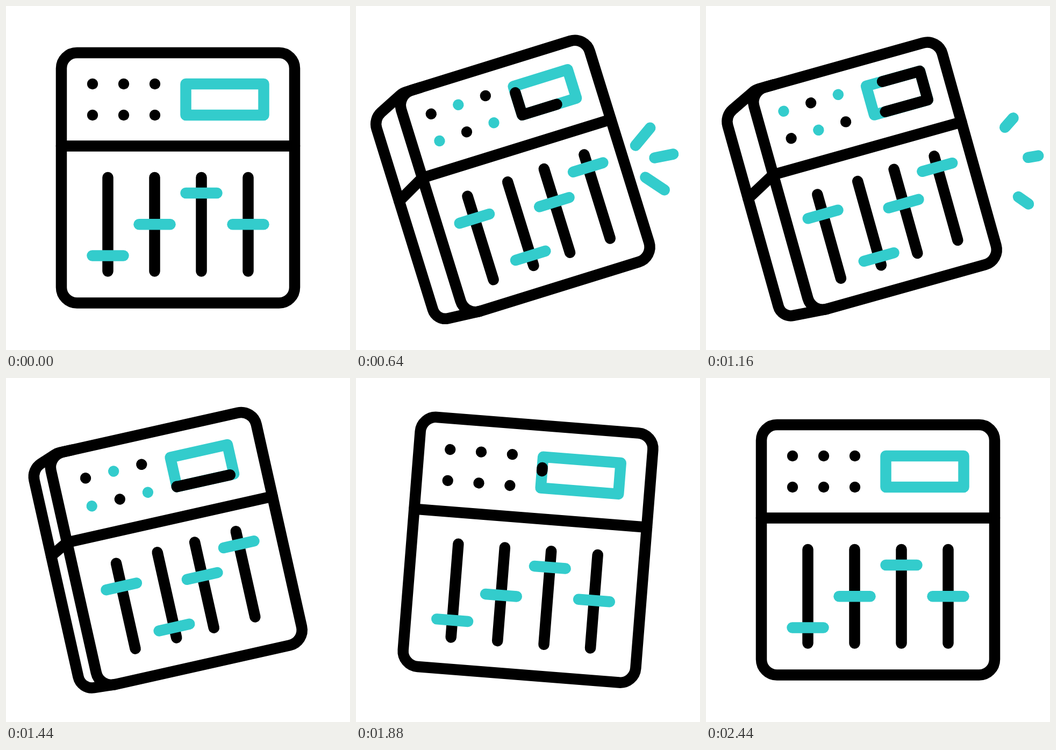
An HTML page with a canvas that plays this animation: 640x640 px, repeating every 2.48 s.

```html
<!DOCTYPE html>
<html lang="en">
<head>
<meta charset="utf-8">
<title>Mixer</title>
<style>
html, body { margin: 0; width: 100%; height: 100%; overflow: hidden; background: #fff; }
canvas { display: block; width: 640px; height: 640px; }
</style>
</head>
<body>
<canvas id="stage" width="640" height="640"></canvas>
<script>
const ctx = document.getElementById('stage').getContext('2d');
const LOOP = 2480, STEP = 40;
const BLACK = '#000', TEAL = '#33cccc';
const CORNER = 29;

const mix = (a, b, p) => a + (b - a) * p;

// Ease in and out from 0 to 1; a skew below 1 starts faster and settles longer.
function ease(t, from, to, skew = 1) {
  const x = Math.min(1, Math.max(0, (t - from) / (to - from))) ** skew;
  return x * x * (3 - 2 * x);
}

const rise = t => ease(t, 80, 730);
const bodyTurn = t => rise(t) - ease(t, 1135, 1840);
const panelTurn = t => rise(t) - ease(t, 1360, 1715);
const faderTurn = t => rise(t) - ease(t, 1410, 1960, 0.66);

// Lean back, relax a little, swing past upright, settle.
const angle = t => -18.2 * rise(t) + 2.7 * ease(t, 920, 1200)
  + 20.5 * ease(t, 1340, 1950, 0.8) - 5 * ease(t, 1950, 2420);

function line(color, ...points) {
  ctx.strokeStyle = color;
  ctx.beginPath();
  for (const [x, y] of points) ctx.lineTo(x, y);
  ctx.stroke();
}

function drawBody(p) {
  const left = mix(-217, -186, p), right = mix(217, 177.5, p);
  const top = mix(-233, -219.4, p), bottom = mix(232.5, 209, p);
  const divider = mix(-59.5, -58.4, p);

  ctx.strokeStyle = BLACK;
  ctx.beginPath();
  ctx.roundRect(left, top, right - left, bottom - top, CORNER);
  ctx.stroke();

  const back = mix(left, left - 57, p);
  if (p > 0.002) {
    const shoulder = top + 32 * p, foot = bottom - 7 * p;
    const inner = left + CORNER;
    ctx.beginPath();
    ctx.moveTo(inner + 18, top);
    ctx.arcTo(mix(inner, left + 11, p), top, back, shoulder, CORNER);
    ctx.arcTo(back, shoulder, back, foot, CORNER);
    ctx.arcTo(back, foot, inner, bottom, CORNER - 5 * p);
    ctx.lineTo(inner, bottom);
    ctx.stroke();
  }
  line(BLACK, [back, divider + 30 * p], [left, divider], [right, divider]);
}

// Alternate dots light up in a checkerboard that flips every 480 ms.
function drawDots(p, t) {
  const lit = t >= 240 && t < 1680;
  const beat = Math.floor((t - 240) / 480);
  for (let i = 0; i < 6; i++) {
    const col = i % 3, row = (i - col) / 3;
    const x = mix(-101, -82.5, p) + (col - 1) * mix(58, 53, p);
    const y = mix(-175, -167, p) + row * mix(58, 52.5, p) - 1.2 * col * p;
    ctx.fillStyle = lit && (row + col + beat) % 2 === 1 ? TEAL : BLACK;
    ctx.beginPath();
    ctx.arc(x, y, 10.2, 0, 2 * Math.PI);
    ctx.fill();
  }
}

// A black stroke runs around the teal frame, growing and then shrinking.
function drawDisplay(p, t) {
  const x0 = mix(14.5, 25, p), x1 = mix(159.5, 128.5, p);
  const y0 = mix(-175, -170.6, p), y1 = mix(-117, -115, p);
  const lap = [[x0, y0], [x1, y0], [x1, y1], [x0, y1]];
  const around = 2 * (x1 - x0 + y1 - y0);
  line(TEAL, ...lap, ...lap.slice(0, 2));

  const grown = ease(t, 328, 1120), spent = ease(t, 900, 2000, 0.65);
  if (grown - spent < 0.001) return;
  const tail = 0.448 + 0.000267 * t + spent;
  ctx.setLineDash([(grown - spent) * around, 3 * around]);
  ctx.lineDashOffset = -tail * around;
  line(BLACK, ...lap, ...lap, lap[0]);
  ctx.setLineDash([]);
}

function drawFaders(p) {
  [0.237, 0.902, 0.409, 0.132].forEach((level, i) => {
    const k = i - 1.5;
    const x = mix(87 * k, k * (70.3 + 2.6 * k * k) - 2.6, p);
    const top = mix(-1, -6 - 3.3 * k, p);
    const bottom = mix(173.5, 156.3 - 3.2 * k, p);
    const restLevel = 0.5 + Math.cos(i * Math.PI / 2) / 3;
    const y = mix(top, bottom, mix(restLevel, level, p));
    line(BLACK, [x, top], [x, bottom]);
    line(TEAL, [x - 29, y], [x + 29, y]);
  });
}

// Three rays fan out from the right side.
function drawRays(t) {
  const head = 0.6 * ease(t, 540, 660) + 0.4 * ease(t, 660, 1220);
  const tail = ease(t, 710, 1430);
  if (head - tail < 0.001) return;
  for (let k = -1; k <= 1; k++) {
    const bend = k * k;
    const heading = (6 + 42 * k + 3 * bend) * Math.PI / 180;
    const length = 63.5 + 13 * bend;
    const at = f => [
      236 - 27 * bend + f * length * Math.cos(heading),
      34 + 31 * k - 1.5 * bend + f * length * Math.sin(heading)
    ];
    line(TEAL, at(tail), at(head));
  }
}

function draw(t) {
  ctx.setTransform(1, 0, 0, 1, 0, 0);
  ctx.fillStyle = '#fff';
  ctx.fillRect(0, 0, 640, 640);
  ctx.translate(320, 320);
  ctx.rotate(angle(t) * Math.PI / 180);
  ctx.lineWidth = 20.5;
  ctx.lineCap = ctx.lineJoin = 'round';
  drawBody(bodyTurn(t));
  drawDots(panelTurn(t), t);
  drawDisplay(panelTurn(t), t);
  drawFaders(faderTurn(t));
  drawRays(t);
}

const start = performance.now();
function tick() {
  const t = (performance.now() - start) % LOOP;
  draw(Math.floor(t / STEP) * STEP);
  requestAnimationFrame(tick);
}
tick();
</script>
</body>
</html>
```
